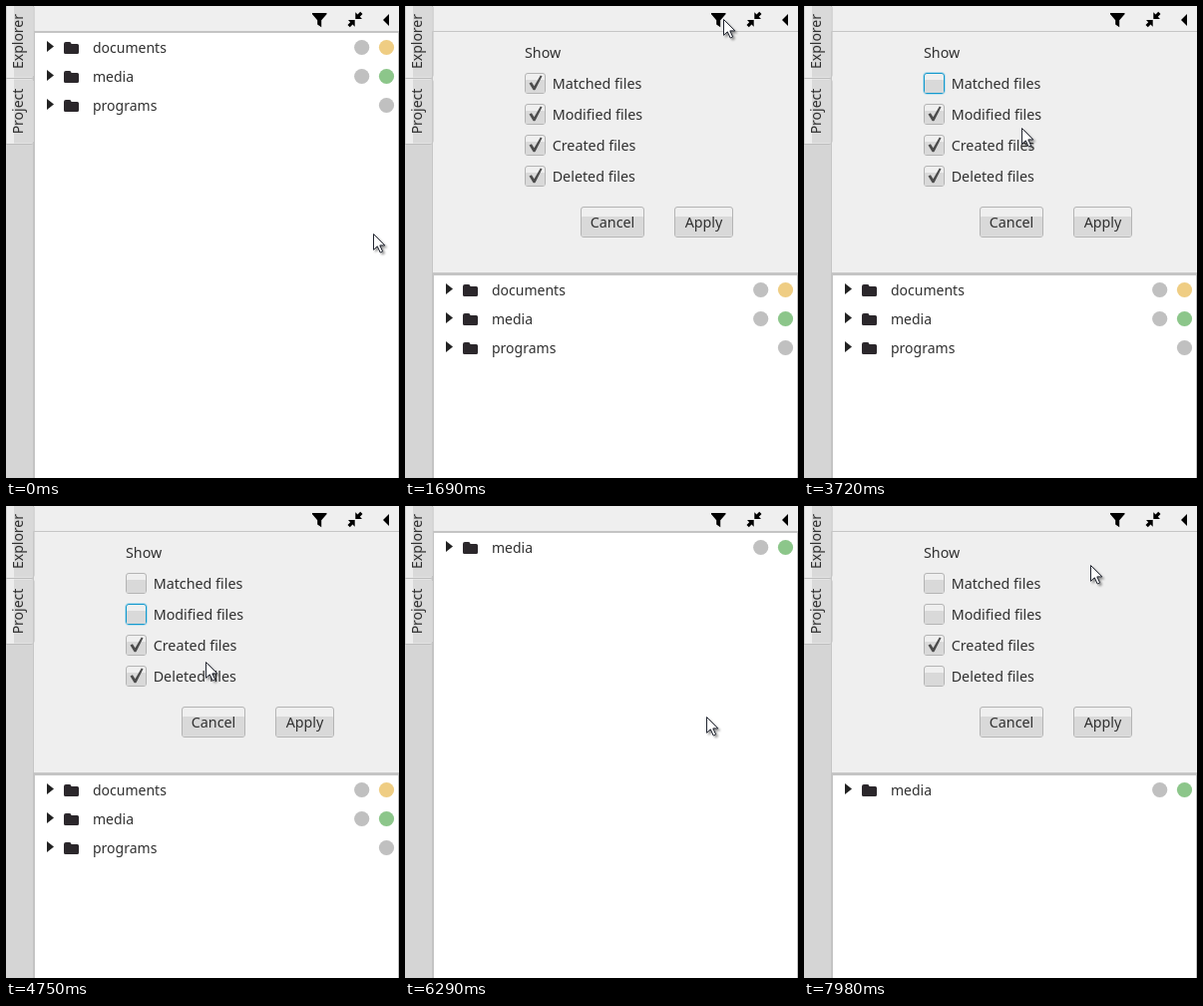
Animation of 394x473 px, one loop 8000 ms. Source, as an HTML page:

```html
<!DOCTYPE html>
<html lang="en">
<head>
<meta charset="utf-8">
<title>File tree filter</title>
<style>
  html, body { margin: 0; height: 100%; overflow: hidden; background: #fff; }
  svg { display: block; width: 394px; height: 473px; }
  text { font: 14.3px "Noto Sans", "Open Sans", sans-serif; fill: #303030; }
  #tree text, #tabs text { font-size: 14px; }
  .face { fill: #efefef; stroke: #b4b4b4; }
  .shade { fill: #d9d9d9; }
  .focus .face { stroke: #1398cc; }
  .pressed .face { fill: #d6d6d6; }
  .glow { fill: none; }
  .focus .glow { stroke: #b4dded; }
  #cursor { fill: #fff; stroke: #20242f; filter: drop-shadow(2px 2px 1px #0006); }
</style>
</head>
<body>
<svg viewBox="0 0 394 473">
  <defs>
    <path id="arrow" d="M343 14h6.7v6.7l-2.2-2.2-2.7 2.7-2.3-2.3 2.7-2.7z"/>
  </defs>
  <rect width="394" height="473" fill="#efefef"/>
  <rect width="28" height="473" fill="#d5d5d5"/>
  <path d="M27.5 0v473" stroke="#c4c4c4"/>
  <g id="tabs"></g>
  <path d="M307 7h14.5v1.2l-5.3 6v7l-4-2.8v-4.2l-5.2-6z"/>
  <use href="#arrow"/>
  <use href="#arrow" transform="rotate(180 350 13.5)"/>
  <path d="M384 8v12l-6-6z"/>
  <g id="panel">
    <path d="M394 25.5H27.5V267.5H394" fill="none" stroke="#c6c6c6"/>
    <text x="120" y="52">Show</text>
  </g>
  <g id="tree">
    <rect x="28" y="25" width="366" height="448" fill="#c4c4c4"/>
    <rect x="29" y="27" width="364" height="446" fill="#fff"/>
  </g>
  <path id="cursor" d="M.5 .5v15.8l3.8-3.5 2.9 6.2 2.4-1.1-2.8-6h5z"/>
</svg>
<script>
const LOOP = 8000, ROW = 29, PANEL_HEIGHT = 243, HOLD = 100;
const GREY = '#c0c0c0', AMBER = '#efcd83', GREEN = '#8cc68a';
const $ = id => document.getElementById(id);

function add(parent, markup) {
  $(parent).insertAdjacentHTML('beforeend', `<g>${markup}</g>`);
  return $(parent).lastElementChild;
}

// Raised surface: light upper third, darker below
const face = (x, y, w, h) => `
  <rect class="glow" x="${x - .5}" y="${y - .5}" width="${w + 1}" height="${h + 1}" rx="3.5"/>
  <rect class="face" x="${x + .5}" y="${y + .5}" width="${w - 1}" height="${h - 1}" rx="2.5"/>
  <rect class="shade" x="${x + 1}" y="${y + Math.round(h / 3)}" width="${w - 2}" height="${h * 2 / 3 - 1}" rx="1"/>`;

const addTab = (label, top, height) => add('tabs', `
  <path d="M0 ${top}h25q3 0 3 3v${height - 6}q0 3-3 3h-25z" fill="#ededed" stroke="#bdbdbd"/>
  <rect class="shade" x="8" y="${top + 1}" width="19" height="${height - 2}"/>
  <text transform="translate(17.3 ${top + height / 2}) rotate(-90)" text-anchor="middle">${label}</text>`);

function addCheckBox(label, i) {
  const y = 67 + 31 * i;
  return add('panel', `${face(120, y, 21, 21)}
    <path class="tick" d="M124.5 ${y + 10.5}l2.4-1.2 2.6 4 6.3-10.8 1.7.8-6.8 13.4q-1.2 1.2-2.4 0z" fill="#4c4c4c"/>
    <text x="147.7" y="${y + 16}">${label} files</text>`);
}

const addButton = (label, x, w) => add('panel', `${face(x, 201, w, 31)}
  <text x="${x + w / 2}" y="222" text-anchor="middle">${label}</text>`);

const addRow = (label, ...colors) => add('tree', `
  <path d="M41 35v11l7-5.5z" fill="#222"/>
  <path d="M58 38q0-2 2-2h3.5q2 0 2 2h6q1.5 0 1.5 1.5v7q0 1.5-1.5 1.5h-12q-1.5 0-1.5-1.5z" fill="#2b272b"/>
  <text x="87" y="47">${label}</text>
  ${colors.map((c, i) => `<circle cx="${381.5 - 24.8 * i}" cy="41.5" r="7.6" fill="${c}"/>`).join('')}`);

addTab('Explorer', -1.5, 74);
addTab('Project', 72.5, 66);
const [matched, modified, created, deleted] = ['Matched', 'Modified', 'Created', 'Deleted'].map(addCheckBox);
const cancel = addButton('Cancel', 176, 64), apply = addButton('Apply', 270, 59);
const controls = [matched, modified, created, deleted, cancel, apply];
const rows = [addRow('documents', AMBER, GREY), addRow('media', GREEN, GREY), addRow('programs', GREY)];

// Each press takes effect on release, HOLD ms later
const FILTER = $('panel');
const presses = [
  [1530, FILTER], [3150, matched], [4180, modified], [4940, deleted], [5610, apply], [7580, FILTER]
];
// Pointer moves: start, end, x, y
const HOME = [368, 228];
const moves = [
  [460, 1240, 322, 25], [1270, 1430, 319, 13],
  [2280, 2580, 247, 74], [2580, 2850, 128, 76],
  [3270, 3520, 218, 122], [3850, 4090, 130, 107],
  [4280, 4520, 212, 155], [4720, 4850, 130, 165],
  [5260, 5530, 302, 211], [6290, 6810, 325, 30],
  [6810, 7020, 316, 10], [7780, 7980, 287, 59]
];

function pointerAt(t) {
  let [x, y] = HOME;
  for (const [start, end, toX, toY] of moves) {
    const k = Math.min(1, Math.max(0, (t - start) / (end - start)));
    const eased = k * k * (3 - 2 * k);
    x += (toX - x) * eased;
    y += (toY - y) * eased;
  }
  return [Math.round(x), Math.round(y)];
}

const show = (el, on) => { el.style.display = on ? '' : 'none'; };

function render(t) {
  const done = presses.filter(([at]) => at + HOLD <= t).map(([, target]) => target);
  const [pressedAt, active] = presses.filter(([at]) => at <= t).pop() || [];
  const filtered = done.includes(apply);
  const open = done.length > 0 && done.at(-1) !== apply;

  show($('panel'), open);
  $('tree').setAttribute('transform', `translate(0 ${open ? PANEL_HEIGHT : 0})`);
  for (const el of controls) {
    const pressed = el === active && t < pressedAt + HOLD;
    el.classList.toggle('focus', el === active);
    el.classList.toggle('pressed', pressed);
    show(el.querySelector('.shade'), !pressed);
    const tick = el.querySelector('.tick');
    if (tick) show(tick, !done.includes(el));
  }
  const visible = filtered ? [rows[1]] : rows;
  rows.forEach(row => show(row, visible.includes(row)));
  visible.forEach((row, i) => row.setAttribute('transform', `translate(0 ${ROW * i})`));
  $('cursor').setAttribute('transform', `translate(${pointerAt(t)})`);
}

const start = performance.now();
function loop(now) {
  render(Math.max(0, now - start) % LOOP);
  requestAnimationFrame(loop);
}
render(0);
requestAnimationFrame(loop);
</script>
</body>
</html>
```
